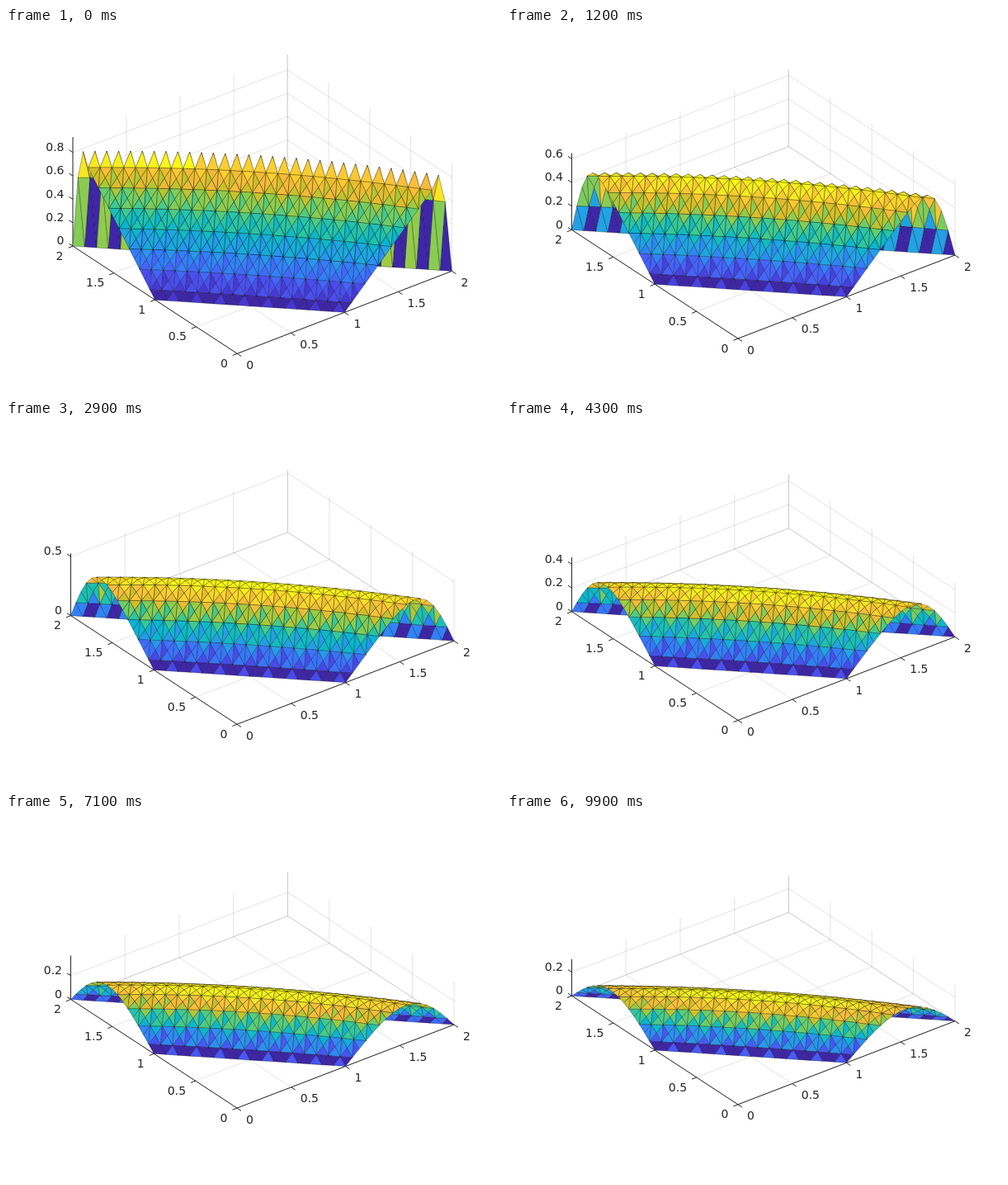
An HTML page with a canvas that plays this animation: 600 by 442 pixels, repeating every 10 s.

```html
<!DOCTYPE html>
<html>
<head>
<meta charset="utf-8">
<style>
html, body { margin: 0; width: 100%; height: 100%; overflow: hidden; background: #fff; }
canvas { display: block; }
</style>
</head>
<body>
<canvas id="stage" width="600" height="442"></canvas>
<script>
const ctx = document.getElementById('stage').getContext('2d');
const N = 16, FRAMES = 100, INK = '#262626';
const PALETTE = [
  [62, 38, 168], [69, 55, 213], [72, 77, 240], [69, 99, 253], [50, 124, 252], [43, 145, 239],
  [32, 165, 227], [8, 181, 208], [25, 191, 182], [55, 200, 151], [100, 205, 111], [157, 203, 67],
  [209, 191, 39], [248, 186, 61], [252, 207, 48], [245, 233, 36], [249, 251, 20]
];

function parula(v) {
  const p = Math.max(0, Math.min(1, v)) * 16, k = Math.min(15, Math.floor(p));
  return 'rgb(' + PALETTE[k].map((c, n) => Math.round(c + (PALETTE[k + 1][n] - c) * (p - k))) + ')';
}

// Heat profile across the band 1 <= x + y <= 2, held at zero on both sides.
// It starts as a ramp that overshoots just before the back edge.
const profiles = [Array.from({ length: N + 1 }, (_, s) => s / N)];
profiles[0].splice(N - 2, 3, 0.93, 0.66, 0);
for (let n = 1; n < FRAMES; n++) {
  const rate = 0.234 - 0.00094 * n;
  profiles.push(profiles[n - 1].map((h, s, p) =>
    s % N ? h + rate * (p[s - 1] + p[s + 1] - 2 * h) : 0));
}

// The ridge sinks towards both open ends, a little more as time goes on.
function height(n, i, j) {
  const side = (i - j) / (i + j);
  return profiles[n][i + j - N] * (1 - (0.07 + 0.0009 * n) * side * side);
}

// Triangles from back to front; the last entry is the node that gives the colour.
const mesh = [];
for (let s = N - 1; s >= -1; s--) for (let i = 0; i <= s + N; i++) {
  const j = s + N - i, odd = i % 2;
  const low = [i, j], right = [i + 1, j], left = [i, j + 1], top = [i + 1, j + 1];
  if (s % 2 && s > 0 && s < N - 1) {
    mesh.push([low, left, top, left], [low, right, top, odd ? low : right]);
    continue;
  }
  const useTop = s === 12 ? i < 9 : odd;
  if (s < N - 1) mesh.push([top, left, right, useTop ? top : right]);
  if (s >= 0) mesh.push([low, left, right, odd && s ? right : low]);
}

function draw(n) {
  const zMax = Math.max(...profiles[n]);
  const scale = Math.min(1, 362 / (232.6 + 143.4 * zMax));
  const base = 213.3 + scale * (232.6 + 143.4 * zMax) / 2;
  const project = (x, y, z) => [
    310 + scale * (-30 + 131.5 * x - 100.75 * y),
    base - scale * (50.5 * x + 65.8 * y + 143.4 * z)
  ];
  const line = (...points) => {
    ctx.beginPath();
    points.forEach(p => ctx.lineTo(...project(...p)));
    ctx.stroke();
  };
  const tick = (p, dx, dy, text, tx, ty, align) => {
    const [x, y] = project(...p);
    ctx.beginPath();
    ctx.moveTo(x, y);
    ctx.lineTo(x + dx, y + dy);
    ctx.stroke();
    ctx.textAlign = align;
    ctx.fillText(text, x + tx, y + ty);
  };

  ctx.fillStyle = '#fff';
  ctx.fillRect(0, 0, 600, 442);

  const zStep = zMax >= 0.5 && zMax < 0.6 ? 0.5 : 0.2;
  const zTicks = [];
  for (let k = 0; k * zStep <= zMax; k++) zTicks.push(+(k * zStep).toFixed(1));
  const ticks = [0, 0.5, 1, 1.5, 2];

  ctx.lineWidth = 0.8;
  ctx.strokeStyle = 'rgba(38,38,38,0.16)';
  for (const v of ticks) {
    line([v, 0, 0], [v, 2, 0], [v, 2, zMax]);
    line([0, v, 0], [2, v, 0], [2, v, zMax]);
  }
  for (const z of zTicks) line([0, 2, z], [2, 2, z], [2, 0, z]);

  ctx.strokeStyle = ctx.fillStyle = INK;
  ctx.lineWidth = 1;
  ctx.font = '14px "DejaVu Sans", sans-serif';
  ctx.textBaseline = 'middle';
  line([0, 2, zMax], [0, 2, 0], [0, 0, 0], [2, 0, 0]);
  for (const v of ticks) {
    tick([v, 0, 0], 5, 3.3, v, 11, 15, 'left');
    tick([0, v, 0], -5.6, 2.2, v, -11.5, 13, 'right');
  }
  for (const z of zTicks) tick([0, 2, z], -4.5, -2.9, z, -10.5, -5.5, 'right');

  ctx.lineWidth = 0.5;
  ctx.lineJoin = 'round';
  ctx.strokeStyle = 'rgba(0,0,0,0.6)';
  for (const tri of mesh) {
    ctx.beginPath();
    for (const [i, j] of tri.slice(0, 3)) ctx.lineTo(...project(i / N, j / N, height(n, i, j)));
    ctx.closePath();
    ctx.fillStyle = parula(height(n, ...tri[3]) / zMax);
    ctx.fill();
    ctx.stroke();
  }
}

const begin = performance.now();
let shown = -1;
function tickFrame() {
  const n = Math.floor((performance.now() - begin) / 100) % FRAMES;
  if (n !== shown) draw(shown = n);
  requestAnimationFrame(tickFrame);
}
tickFrame();
</script>
</body>
</html>
```
